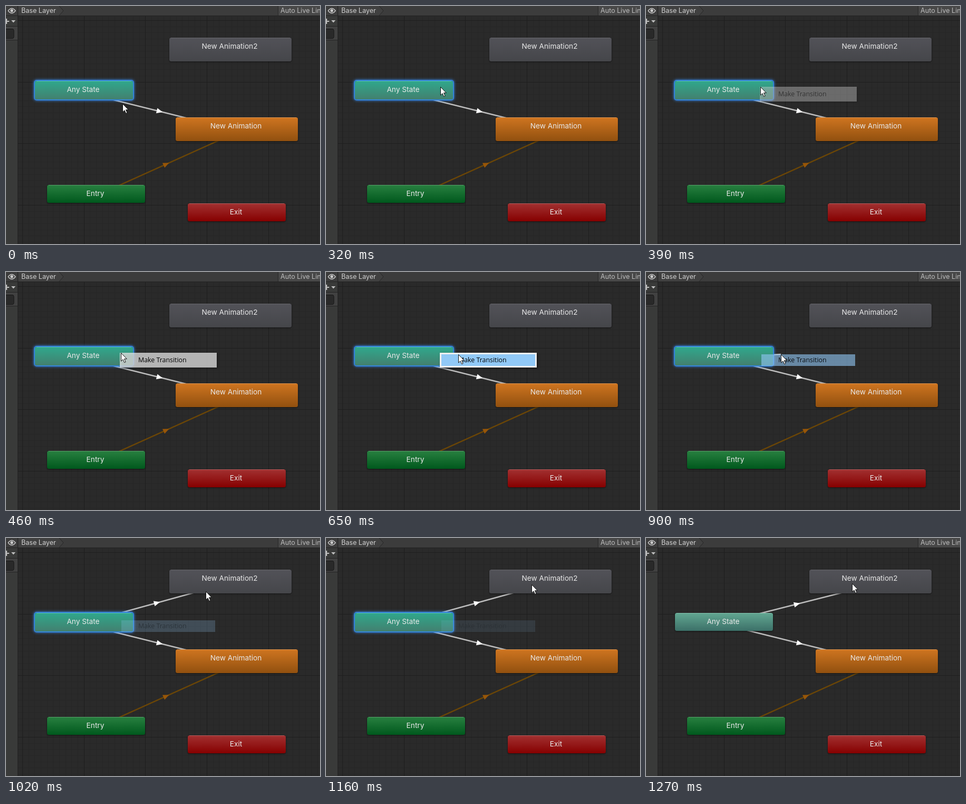
Write an HTML page with a canvas that moves like this. It is 596 by 451 pixels and loops after 1900 ms.

```html
<!DOCTYPE html>
<html lang="en">
<head>
<meta charset="utf-8">
<style>
html, body { margin: 0; width: 100%; height: 100%; overflow: hidden; background: #2a2a2a; }
canvas { display: block; }
</style>
</head>
<body>
<canvas id="stage" width="596" height="451"></canvas>
<script>
const c = document.getElementById('stage').getContext('2d');
const LOOP = 1900;
const UI = 'Inter, sans-serif';

// start time, cursor x and y, menu kind, menu opacity, end of the new link
const steps = [
  [0, 221, 185],
  [70, 219, 168],
  [140, 217, 154],
  [320, 217, 153],
  [390, 217, 153, 'menu', 0.35],
  [460, 218, 153, 'menu', 0.72],
  [530, 224, 154, 'menu', 1],
  [590, 240, 155, 'hover', 1],
  [650, 251, 156, 'hover', 1],
  [830, 253, 156, 'item', 0.85],
  [900, 256, 156, 'item', 0.6, 'cursor'],
  [970, 328, 124, 'item', 0.4, 'cursor'],
  [1020, 379, 101, 'item', 0.22, 'node'],
  [1090, 390, 88, 'item', 0.1, 'node'],
  [1180, 391, 86, '', 0, 'node'],
  [1270, 391, 86, '', 0, 'done']
];

function rect(x, y, w, h, color) {
  c.fillStyle = color;
  c.fillRect(x, y, w, h);
}

function poly(points, fill, stroke) {
  c.beginPath();
  points.forEach(p => c.lineTo(...p));
  c.closePath();
  if (fill) { c.fillStyle = fill; c.fill(); }
  if (stroke) { c.lineWidth = 1; c.strokeStyle = stroke; c.stroke(); }
}

function box(x, y, w, h, r) {
  c.beginPath();
  c.roundRect(x, y, w, h, r);
}

function text(str, x, y, size, color, align = 'left', family = UI) {
  c.font = `${size}px ${family}`;
  c.textAlign = align;
  c.fillStyle = color;
  c.fillText(str, x, y);
}

function grid(step, color) {
  for (let x = 31 - Math.floor(8 / step) * step; x < 596; x += step) rect(Math.round(x), 19, 1, 432, color);
  for (let y = 27 - Math.floor(8 / step) * step; y < 451; y += step) rect(23, Math.round(y), 573, 1, color);
}

function link(x1, y1, x2, y2, color, head) {
  c.strokeStyle = color;
  c.lineWidth = 2.5;
  c.beginPath();
  c.moveTo(x1, y1);
  c.lineTo(x2, y2);
  c.stroke();
  c.save();
  c.translate((x1 + x2) / 2, (y1 + y2) / 2);
  c.rotate(Math.atan2(y2 - y1, x2 - x1));
  poly([[-6, -5], [5.5, 0], [-6, 5]], head);
  c.restore();
}

const whiteLink = (...ends) => link(...ends, '#bcbcbc', '#fff');

function node(label, x, y, w, h, top, bottom, edge, selected) {
  c.save();
  c.shadowColor = selected ? '#3a8cf0' : 'rgba(0,0,0,.6)';
  c.shadowBlur = selected ? 5 : 3;
  c.shadowOffsetY = selected ? 0 : 1;
  if (selected) {
    box(x - 1, y - 1, w + 2, h + 2, 4);
    c.lineWidth = 2;
    c.strokeStyle = '#2f7fd0';
    c.stroke();
  }
  const shade = c.createLinearGradient(0, y, 0, y + h);
  shade.addColorStop(0, top);
  shade.addColorStop(1, bottom);
  box(x, y, w, h, 3.5);
  c.fillStyle = shade;
  c.fill();
  c.restore();
  rect(x + 3, y, w - 6, 1, edge);
  text(label, x + w / 2 - 1.5, y + 21, 13.7, '#e9e9e9', 'center');
}

function chrome() {
  rect(0, 0, 596, 19, '#3c3c3c');
  poly([[23, 0], [101, 0], [109, 9], [101, 18], [23, 18]], '#404040');
  c.strokeStyle = '#272727';
  c.lineWidth = 1;
  c.beginPath();
  c.moveTo(101, 0);
  c.lineTo(109, 9);
  c.lineTo(101, 18);
  c.stroke();
  text('Base Layer', 29, 13, 12.6, '#d0d0d0');
  rect(516, 0, 80, 18, '#484848');
  rect(516, 0, 1, 18, '#272727');
  text('Auto Live Link', 521, 13, 12.6, '#bdbdbd');

  rect(0, 19, 22, 432, '#393a39');
  rect(0, 39, 22, 25, '#414141');
  rect(22, 0, 1, 451, '#202020');
  [18, 38, 64].forEach((y, i) => rect(0, y, i ? 22 : 596, 1, '#232323'));
  box(-6, 43.5, 21, 18, 3);
  c.fillStyle = '#292929';
  c.fill();
  c.strokeStyle = '#181818';
  c.stroke();

  c.strokeStyle = '#c8c8c8';
  c.lineWidth = 1.4;
  c.beginPath();
  c.moveTo(4, 9);
  c.quadraticCurveTo(11, 0, 18, 9);
  c.quadraticCurveTo(11, 18, 4, 9);
  c.stroke();
  c.beginPath();
  c.arc(11, 8.7, 2.8, 0, 7);
  c.fillStyle = '#c8c8c8';
  c.fill();
  rect(0, 28, 6, 2, '#c0c0c0');
  rect(0, 24, 2, 10, '#c0c0c0');
  poly([[10, 27], [18, 27], [14, 31.5]], '#c0c0c0');
}

function menu(kind, alpha) {
  if (!kind) return;
  c.save();
  c.globalAlpha = alpha;
  if (kind !== 'item') {
    c.save();
    c.shadowColor = 'rgba(0,0,0,.5)';
    c.shadowBlur = 4;
    c.shadowOffsetX = c.shadowOffsetY = 2;
    rect(216, 153, 184, 28, '#f0f0f0');
    c.restore();
  }
  if (kind !== 'menu') rect(219, 156, 178, 22, '#91c9f7');
  c.globalAlpha = Math.min(1, alpha * 1.5);
  text('Make Transition', 251, 171, 12.4, '#000', 'left', '"Open Sans", "Noto Sans", sans-serif');
  c.restore();
}

function cursor(x, y) {
  c.save();
  c.translate(x + 0.5, y + 0.5);
  poly([[0, 0], [0, 15.5], [3.5, 12.2], [6.2, 18], [8.6, 17], [6, 11.2], [10.8, 11.2]], '#fff', '#111');
  c.restore();
}

function draw(time) {
  const [, x, y, kind, alpha, target] = steps.findLast(s => s[0] <= time);
  const selected = target !== 'done';

  rect(0, 0, 596, 451, '#2a2a2a');
  grid(11.667, '#262626');
  grid(116.67, '#1e1e1e');

  link(171, 359.7, 438, 239.3, '#6b4606', '#985608');
  whiteLink(148, 164, 436, 235.5);
  if (target === 'cursor') whiteLink(148, 161, x, y);
  if (target === 'node') whiteLink(148, 161, 426, 84.5);
  if (target === 'done') whiteLink(148, 160.2, 426, 90);

  node('New Animation2', 310, 60, 232, 45, '#525258', '#45464a', '#67676c');
  const teal = selected ? ['#2fa88c', '#43806f', '#55bda5'] : ['#62a792', '#3c7068', '#83bfac'];
  node('Any State', 55, 142, 186, 35 - !selected, ...teal, selected);
  node('New Animation', 322, 211, 232, 45, '#cf7520', '#91500f', '#dc9450');
  node('Entry', 78, 339, 186, 34, '#288040', '#00581d', '#579d69');
  node('Exit', 345, 374, 186, 34, '#a23131', '#860000', '#b95c5c');

  chrome();
  menu(kind, alpha);
  cursor(x, y);
}

function tick() {
  draw(performance.now() % LOOP);
  requestAnimationFrame(tick);
}
tick();
</script>
</body>
</html>
```
